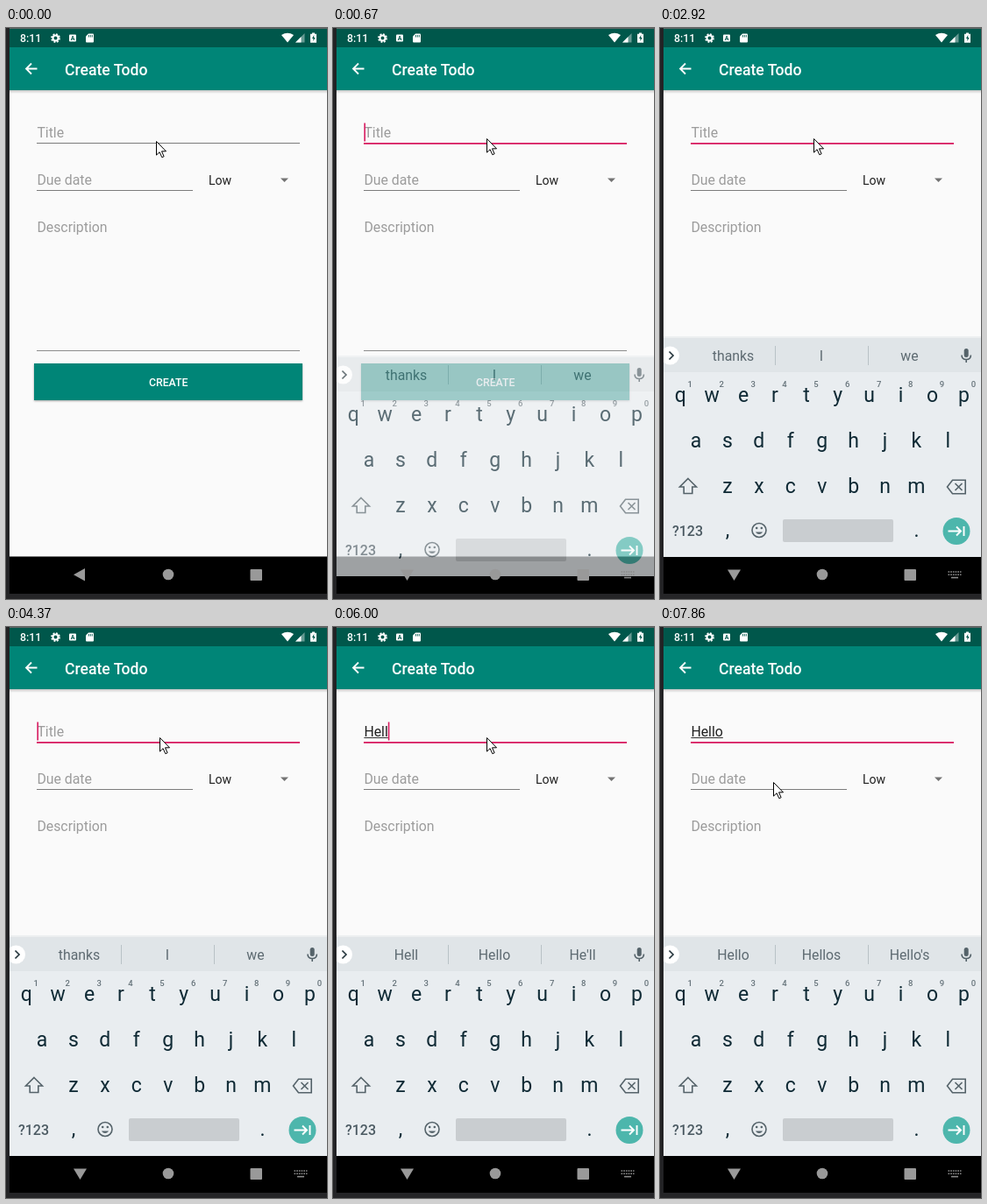
These frames come from a looping animation (366 by 652 pixels, 8 s). An HTML page:

```html
<!DOCTYPE html>
<html lang="en">
<head>
<meta charset="utf-8">
<title>Create Todo</title>
<style>
  html, body { margin: 0; width: 100%; height: 100%; overflow: hidden; background: #fafafa; }
  svg { display: block; width: 366px; height: 652px; font-family: Roboto, "Noto Sans", sans-serif; }
  .field { font-size: 15.84px; }
  .hint { fill: #9c9c9c; }
  .medium { font-weight: 500; }
  .mid { text-anchor: middle; }
  .key { font-size: 23px; fill: #0f2a35; }
  .digit { font-size: 9.5px; font-weight: 500; fill: #66737a; }
  .word { font-size: 15.84px; fill: #5d6a71; }
  .icon { fill: none; stroke: #55636a; stroke-width: 1.6; }
  #create { filter: drop-shadow(0 1px 1px rgba(0,0,0,.35)); }
</style>
</head>
<body>
<svg viewBox="0 0 366 652">
  <defs>
    <linearGradient id="shade" x2="0" y2="1">
      <stop offset="0" stop-color="#000" stop-opacity=".2"/>
      <stop offset="1" stop-color="#000" stop-opacity="0"/>
    </linearGradient>
  </defs>
  <rect width="366" height="652" fill="#fafafa"/>

  <!-- status bar -->
  <rect width="366" height="22" fill="#00574b"/>
  <rect width="366" height="1" fill="#5d6665"/>
  <text class="medium" x="16" y="16" font-size="12.3" fill="#fff">8:11</text>
  <g fill="none" stroke="#fff">
    <circle cx="56.5" cy="11.5" r="4.5" stroke-width="1.8" stroke-dasharray="1.9 1.634"/>
    <circle cx="56.5" cy="11.5" r="3" stroke-width="2"/>
  </g>
  <rect x="72" y="7.5" width="8" height="8" rx="1" fill="#fff"/>
  <text class="mid" x="76" y="14" font-size="7" font-weight="700" fill="#00574b">A</text>
  <path d="M94 6.5h5q1 0 1 1v8q0 1-1 1h-7q-1 0-1-1V9.5z" fill="#fff"/>
  <path d="M94.3 8v2.5M96.3 8v2.5M98.3 8v2.5" stroke="#00574b" stroke-width=".9"/>
  <path d="M314 8Q321 3.5 328 8L321 16.5z" fill="#fff"/>
  <path d="M340.5 6v10.5h-10.5z" fill="#fff" opacity=".4"/>
  <path d="M336.5 10v6.5h-6.5z" fill="#fff"/>
  <path d="M349 5.5h3v1.2h2v10h-7v-10h2z" fill="#fff"/>
  <path d="M351.2 8l-2.2 4h1.4v3l2.2-4h-1.4z" fill="#00574b"/>

  <!-- app bar -->
  <rect y="22" width="366" height="49" fill="#008577"/>
  <rect y="71" width="366" height="4" fill="url(#shade)"/>
  <path d="M35.5 46.5H23.5M29 40.5l-6 6 6 6" fill="none" stroke="#fff" stroke-width="1.8"/>
  <text class="medium" x="67" y="53.5" font-size="17.6" fill="#fff">Create Todo</text>

  <!-- form -->
  <text id="titleHint" class="field hint" x="35.4" y="125">Title</text>
  <text id="titleText" class="field" x="35.4" y="125" fill="#212121"></text>
  <rect id="composing" x="35.4" y="126" height="1" fill="#333"/>
  <rect id="titleLine" x="35" width="300"/>
  <rect id="caret" y="108.5" width="1.6" height="21" fill="#d81b60"/>
  <text class="field hint" x="35.4" y="179">Due date</text>
  <rect x="35" y="185" width="178" height="1" fill="#7c7c7c"/>
  <text x="231" y="179" font-size="14.08" fill="#212121">Low</text>
  <path d="M313 171.5h9l-4.5 4.5z" fill="#737373"/>
  <text class="field hint" x="35.4" y="232.5">Description</text>
  <rect x="35" y="368" width="300" height="1" fill="#8c8c8c"/>
  <rect id="create" x="32" y="383" width="306" height="42" fill="#008577"/>
  <text class="medium mid" x="185.2" y="409" font-size="12.3" fill="#fff">CREATE</text>

  <rect y="603.5" width="366" height="43" fill="#000"/>

  <g id="keyboard">
    <rect y="352" width="366" height="252" fill="#e9edf0"/>
    <rect y="352" width="366" height="41" fill="#e0e5e8"/>
    <rect y="352" width="366" height="2" fill="#eceff0"/>
    <path d="M131.5 363v22M237.5 363v22" stroke="#b9c2c6"/>
    <circle cx="11.5" cy="374" r="10.5" fill="#fff"/>
    <path d="M10.5 369.5l4.5 4.5-4.5 4.5" fill="none" stroke="#26363d" stroke-width="1.7"/>
    <rect x="346.7" y="366" width="5" height="10" rx="2.5" fill="#55636a"/>
    <path d="M344 373.5q0 5 5.2 5t5.2-5M349.2 378.5v3.5" class="icon" stroke-width="1.4"/>
    <path d="M32 514.5l9.5 9.5h-4.7v7.5h-9.6V524h-4.7z" class="icon"/>
    <path d="M333.5 516.3h14.7v15.4h-14.7l-6-7.7zM336.5 520l8 8M344.5 520l-8 8" class="icon"/>
    <text class="medium mid" x="31.5" y="580" font-size="16" fill="#4c5b63">?123</text>
    <circle cx="113" cy="573.5" r="8" class="icon"/>
    <path d="M108.8 575.5q4.2 5 8.4 0z" fill="#55636a"/>
    <circle cx="110.2" cy="571" r="1.3" fill="#55636a"/>
    <circle cx="115.8" cy="571" r="1.3" fill="#55636a"/>
    <rect x="140" y="561" width="126" height="26" rx="2" fill="#c9cdd0"/>
    <circle cx="338" cy="574.5" r="15.5" fill="#4db6ac"/>
    <path d="M328.5 574.5h14M338 569.5l5 5-5 5M346.5 569v11" fill="none" stroke="#fff" stroke-width="1.9"/>
  </g>

  <!-- navigation icons -->
  <g fill="#999">
    <path id="backIcon"/>
    <circle cx="185" cy="624" r="6.3"/>
    <rect x="278.5" y="618" width="13.5" height="13" rx="1"/>
    <g id="imeIcon" fill="none" stroke="#8a8a8a" stroke-width="1.6">
      <path d="M328.5 621h15M328.5 624.2h15" stroke-dasharray="1.7 1"/>
      <path d="M332 627.6h8"/>
    </g>
  </g>

  <!-- window frame -->
  <rect width="4" height="652" fill="#232325"/>
  <rect y="646" width="366" height="6" fill="#252527"/>

  <path id="pointer" d="M.5 .5v15.6l3.6-3.4 2.7 6 2.3-1-2.6-5.9h5z" fill="#fff" stroke="#000"/>
</svg>
<script>
const LOOP = 8000;
const $ = id => document.getElementById(id);

// Each track lists [start ms, value...]; a value holds until the next start.
const pointerTrack = [
  [0, 171, 129], [150, 173, 127], [270, 175, 126], [6860, 239, 126], [7010, 212, 168],
  [7130, 171, 223], [7290, 136, 232], [7440, 121, 236], [7590, 120, 227],
  [7740, 124, 200], [7860, 129, 177]
];
const keyboardTrack = [[0, 0, 22], [670, 0.68, 22], [820, 1, 0]];
const typingTrack = [
  [0, "", "thanks", "I", "we"],
  [5450, "H", "H", "Hi", "How"],
  [5730, "He", "He", "Hey", "Here"],
  [5880, "Hel", "Hel", "Hello", "Help"],
  [6000, "Hell", "Hell", "Hello", "He'll"],
  [6150, "Hello", "Hello", "Hellos", "Hello's"]
];
const caretToggles = [520, 940, 1490, 1930, 2490, 2920, 3480, 3910, 4370, 4900,
  5450, 6710, 7130, 7590];
const FOCUS = 400;

function at(track, t) {
  let row = track[0];
  for (const step of track) if (step[0] <= t) row = step;
  return row.slice(1);
}

function set(id, attrs) {
  for (const name in attrs) $(id).setAttribute(name, attrs[name]);
}

function addText(label, x, y, cls) {
  const el = document.createElementNS("http://www.w3.org/2000/svg", "text");
  el.setAttribute("x", x);
  el.setAttribute("y", y);
  el.setAttribute("class", "mid " + cls);
  el.textContent = label;
  $("keyboard").append(el);
  return el;
}

function addRow(letters, x, y) {
  [...letters].forEach((c, i) => addText(c, x + i * 35.9, y, "key"));
}

addRow("qwertyuiop", 23.3, 426.5);
addRow("asdfghjkl", 41, 478.5);
addRow("zxcvbnm", 77, 530.5);
addText(",", 77, 581, "key");
addText(".", 292.5, 581, "key");
[..."1234567890"].forEach((c, i) => addText(c, 34.3 + i * 35.9, 409.5, "digit"));
const words = [83.5, 184, 284.5].map(x => addText("", x, 380, "word"));

function draw(t) {
  const [px, py] = at(pointerTrack, t);
  set("pointer", { transform: `translate(${px} ${py})` });

  const [alpha, dy] = at(keyboardTrack, t);
  set("keyboard", { opacity: alpha, transform: `translate(0 ${dy})` });
  set("imeIcon", { opacity: alpha ? 1 : 0 });
  set("backIcon", { d: alpha ? "M77 618.5h15l-7.5 12.5z" : "M90 617v14.5l-13-7.2z" });

  const [typed, ...suggested] = at(typingTrack, t);
  $("titleText").textContent = typed;
  words.forEach((el, i) => el.textContent = suggested[i]);
  const width = typed ? $("titleText").getComputedTextLength() : 0;
  set("titleHint", { opacity: typed ? 0 : 1 });
  set("composing", { width });

  const focused = t >= FOCUS;
  set("titleLine", {
    y: focused ? 131 : 131, height: focused ? 1.8 : 1, fill: focused ? "#d81b60" : "#7c7c7c"
  });
  const blinkOn = caretToggles.filter(ms => ms <= t).length % 2;
  set("caret", { x: 35.4 + width, opacity: blinkOn });
}

const start = performance.now();
function tick() {
  draw((performance.now() - start) % LOOP);
  requestAnimationFrame(tick);
}
draw(0);
requestAnimationFrame(tick);
</script>
</body>
</html>
```
